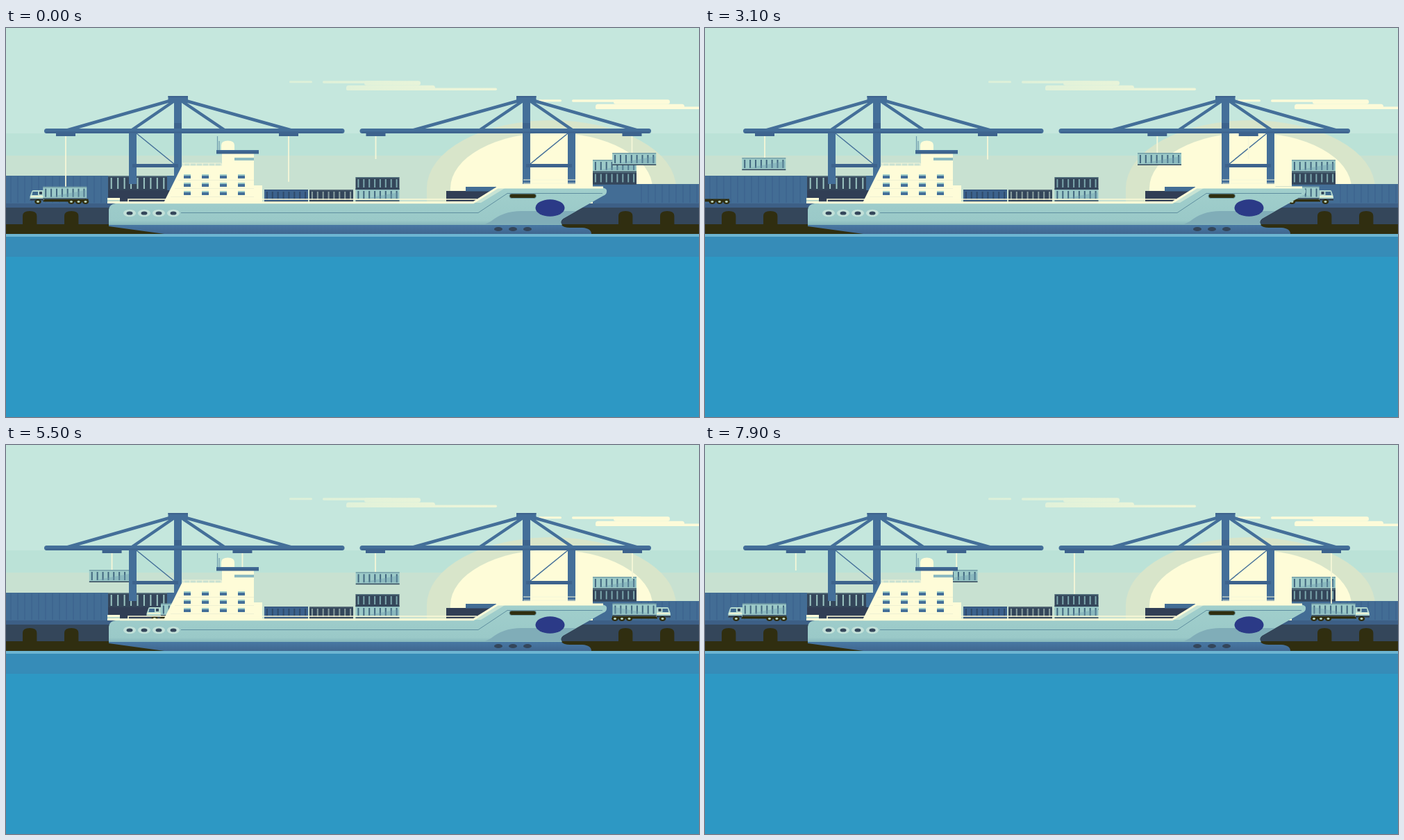
These frames come from a looping animation (998 px wide and 561 px high, 8000 ms). An HTML page:

```html
<!DOCTYPE html>
<html lang="en">
<head>
<meta charset="utf-8">
<title>Harbour</title>
<style>
  html, body { margin: 0; width: 100%; height: 100%; overflow: hidden; background: #2d98c4; }
  svg { display: block; width: 100vw; height: 100vh; }
</style>
</head>
<body>
<svg id="stage" viewBox="0 0 998 561" preserveAspectRatio="none"></svg>
<script>
const LOOP = 8000, STEP = 100;
const C = {
  steel: '#446f99', steelDark: '#3d638d', cream: '#fefcd8', teal: '#9ccac8',
  slate: '#34465a', navy: '#313e55', olive: '#302e10', wall: '#436d95'
};

const rect = (x, y, w, h, fill, extra = '') =>
  `<rect x="${x}" y="${y}" width="${w}" height="${h}" fill="${fill}" ${extra}/>`;
const path = (d, fill, extra = '') => `<path d="${d}" fill="${fill}" ${extra}/>`;
const line = (d, stroke, width = 1, extra = '') =>
  `<path d="${d}" fill="none" stroke="${stroke}" stroke-width="${width}" ${extra}/>`;
const oval = (cx, cy, rx, ry, fill) =>
  `<ellipse cx="${cx}" cy="${cy}" rx="${rx}" ry="${ry}" fill="${fill}"/>`;
const group = (id, body) => `<g id="${id}">${body}</g>`;
const mirror = (sum, body) => `<g transform="matrix(-1 0 0 1 ${sum} 0)">${body}</g>`;
const times = (n, fn) => Array.from({ length: n }, (_, i) => fn(i)).join('');

// Shipping container with vertical ribs
function box(x, y, body, rib, ribs = 8, w = 63, h = 18) {
  const gap = w / ribs;
  return rect(x, y, w, h, body)
    + line(times(ribs, i => `M${(x + gap * (i + .5)).toFixed(1)} ${y + 3}v${h - 6}`), rib, 2)
    + rect(x, y, w, 1.5, rib, 'opacity=".45"')
    + rect(x, y + h - 1.5, w, 1.5, C.slate);
}
const lightBox = (x, y) => box(x, y, C.teal, '#42677f')
  + path(`M${x + 8} ${y + 15}L${x + 62} ${y + 5}V${y + 15}Z`, '#6f9fae', 'opacity=".4"');
const darkBox = (x, y) => box(x, y, C.slate, '#7ba6ac');

function cloud(x, y, fill) {
  const bar = (dx, dy, w, h) => rect(x + dx, y + dy, w, h, fill, `rx="${h / 2}"`);
  return bar(0, 0, 33, 3) + bar(48, 0, 100, 3.4) + bar(108, 0, 81, 6.5)
    + bar(82, 6.5, 128, 7) + bar(82, 10.3, 217, 3.4);
}

// One crane; the right one is the same shape mirrored
const crane = boomLeft =>
  line('M236 105L86 148M241 106L180 148M254 106L316 148M259 105L413 148', C.steel, 4.5)
  + rect(177, 150, 11, 75, C.steel) + rect(242, 106, 11, 119, C.steel)
  + rect(242, 137, 11, 9, C.steelDark)
  + line('M188 152L242 196', C.steel, 1.5)
  + rect(182, 196, 66, 5, C.steelDark)
  + rect(boomLeft, 145, 487.5 - boomLeft, 7, C.steel, 'rx="3.5"')
  + rect(boomLeft + 2, 149.5, 483 - boomLeft, 2, C.steelDark, 'rx="1"')
  + rect(233.5, 98, 28.5, 10, C.steel) + rect(233.5, 98, 28.5, 2, C.steelDark);

const trolley = id => group(id, rect(-14, 151, 28, 5, C.steelDark))
  + `<rect id="${id}Rope" x="-.9" y="156" width="1.8" height="1" fill="#f5f7d8"/>`;

// Truck facing left, front bumper at x = 33
const wheel = x => oval(x, 250.5, 4.8, 3.5, C.olive) + oval(x, 250.5, 2, 1.4, '#b9d3bd');
const truckBody =
  rect(52, 246.5, 65, 4, C.olive)
  + path('M35.5 236Q35.5 234 38 234H53.5V248H33V243Z', '#b5dad0')
  + path('M37 236H44.5V241H36Z', '#3f6a8f') + rect(46.5, 236, 4, 4, C.slate)
  + rect(34, 242, 19, 1.5, C.cream) + rect(33, 246, 20, 3, C.slate)
  + [44.5, 92.5, 103, 113].map(wheel).join('');

function quay() {
  const ribs = (x, n, y) => line(times(n, i => `M${x + i * 10} ${y}V252`), '#3a608b', 1);
  return rect(0, 213, 252, 46, C.wall) + ribs(7, 14, 214)
    + rect(845, 225, 153, 34, C.wall) + ribs(915, 9, 226)
    + rect(0, 253, 998, 6, '#3d5f86') + rect(0, 259, 998, 24, C.slate)
    + rect(0, 283, 998, 14, C.olive)
    + [24, 84, 882, 942].map(x =>
        path(`M${x} 284V271Q${x} 264 ${x + 10.2} 264T${x + 20.4} 271V284Z`, C.olive)).join('')
    + box(147, 213, C.slate, '#9cc6c2', 9, 85, 22)
    + rect(147, 234, 90, 16, C.navy);
}

function bridge() {
  const windows = times(12, i => {
    const x = 256 + (i % 4) * 26, y = 211 + Math.floor(i / 4) * 12;
    return rect(x, y, 10, 6, C.steel) + rect(x, y, 10, 2, C.teal);
  });
  return path('M226.5 253L253.5 198.5H311V176H329V181H357V227H369V253Z', C.cream)
    + path('M310 177V169Q310 162.5 319.5 162.5T329 169V177Z', C.cream)
    + line('M304.5 156V177M307 163V177', '#6f9cae', 1.2)
    + rect(303, 176, 61, 5.5, C.steelDark) + rect(303, 176, 61, 1.5, C.steel)
    + rect(329, 187, 28, 4, '#8cbac1')
    + line('M254 195H310' + times(7, i => `M${256 + i * 9} 195v4`), '#f3f5d8', 1.2)
    + line('M248 219.5H357M243 231.5H357M237 243.5H357', '#eef0d2', 1)
    + windows;
}

function deckCargo() {
  return box(372, 233, '#3c628d', '#2f4a6a') + box(437, 233, C.slate, '#8a9fa0')
    + lightBox(503.5, 232) + darkBox(503.5, 215)
    + rect(634, 235, 66, 15, C.navy) + rect(662, 229, 44, 6.5, C.wall);
}

function hull() {
  const bow = 'L672 253L708 230H858Q866 231 865 236Q865 240 860 242L802 275Q797 279 801 284';
  return rect(146, 245, 18, 8, C.cream) + rect(146, 248, 18, 2, '#b9d8c9')
    + line('M176 253V247H678', C.cream, 1.6)
    + path('M148 286V262Q149 254 158 253' + bow + 'Z', 'url(#hullFill)')
    + path('M148 284H800Q803 288 812 288H830Q843 289 843 297H228L148 286Z', 'url(#keelFill)')
    + path('M698 279Q716 264 742 264H821L802 275Q797 279 800 283L690 283Z', '#80adb8')
    + path('M672 252L708 230H720L684 252Z', '#c7e3d4')
    + line('M164 251.7H673L708 230H860', C.cream, 3, 'stroke-linejoin="round"')
    + line('M745 219H820M745 224H820', '#f3f6d9', 1)
    + line('M252 266.5H680L722 238.5H859', '#5f8fa0', 1)
    + times(4, i => oval(178 + i * 21, 267, 9, 5.2, '#c3e1d9') + oval(178 + i * 21, 267, 4.5, 2.6, C.slate))
    + times(3, i => oval(709 + i * 21, 290, 6, 3, C.slate))
    + rect(725, 239, 38.5, 6.5, C.olive, 'rx="3.2" stroke="#6d9ca6"')
    + oval(783.5, 259.5, 21, 12.2, '#2b3a87');
}

document.getElementById('stage').innerHTML = `
  <defs>
    <linearGradient id="hullFill" x2="0" y2="1">
      <stop offset="0" stop-color="#a1cfcc"/><stop offset=".85" stop-color="#9ac9c8"/>
      <stop offset="1" stop-color="#80b1b7"/>
    </linearGradient>
    <linearGradient id="keelFill" x2="0" y2="1">
      <stop offset="0" stop-color="#4878a3"/><stop offset="1" stop-color="#406790"/>
    </linearGradient>
    <linearGradient id="haze" gradientUnits="userSpaceOnUse" x1="408" x2="707">
      <stop offset="0" stop-color="#dcf0d9"/><stop offset="1" stop-color="#eff6d9"/>
    </linearGradient>
  </defs>`
  + rect(0, 0, 998, 152, '#c5e7dd') + rect(0, 152, 998, 32, '#bbe2d7') + rect(0, 184, 998, 70, '#c8e1d1')
  + path('M606 254V231A179.5 98 0 0 1 965 231V254Z', '#d8e5ca')
  + path('M640 254V231A145.5 80 0 0 1 931 231V254Z', C.cream)
  + cloud(408, 76.3, 'url(#haze)') + cloud(767, 103.3, '#fdfbd9')
  + quay()
  + group('truckL', truckBody + group('truckLoad', lightBox(53.5, 228.5)))
  + group('truckR', mirror(990, truckBody + lightBox(53.5, 228.5)))
  + trolley('a') + trolley('b') + group('cargoL', lightBox(-31.5, 0))
  + crane(55) + mirror(997, crane(68))
  + lightBox(845, 190) + darkBox(845, 207.5)
  + trolley('c') + trolley('d') + group('cargoR', lightBox(-31.5, 0))
  + deckCargo() + bridge() + hull()
  + rect(0, 297, 998, 4.5, '#6db5d2') + rect(0, 301, 998, 29, '#368cb8') + rect(0, 330, 998, 231, '#2d98c4');

const part = Object.fromEntries([...document.querySelectorAll('g[id], rect[id]')].map(e => [e.id, e]));
const put = (id, x, y = 0) => part[id].setAttribute('transform', `translate(${x.toFixed(2)} ${y.toFixed(2)})`);
const show = (id, on) => part[id].setAttribute('visibility', on ? 'inherit' : 'hidden');

// Sine ease from one value to another over a time span
function glide(t, start, span, from, to) {
  const p = Math.min(1, Math.max(0, (t - start) / span));
  return from + (to - from) * (1 - Math.cos(Math.PI * p)) / 2;
}

function hang(id, x, end) {
  put(id, x);
  put(id + 'Rope', x);
  part[id + 'Rope'].setAttribute('height', Math.max(0, end - 156).toFixed(2));
}

function draw(t) {
  // Left crane: lift from the truck, then carry towards the ship
  const ax = glide(t, 3914, 5270, 86, 407);
  const ay = glide(t, -190, 4376, 229, 180);
  hang('a', ax, ay);
  hang('b', 493 - ax, glide(t, -570, 5236, 223, 181));
  put('cargoL', ax - 1.2, ay);

  // Right crane: carry across, then lower behind the deck stack
  const cx = glide(t, -123, 5236, 902, 532);
  const cy = glide(t, 4780, 4376, 180, 229);
  hang('c', cx, cy);
  hang('d', 1434 - cx, glide(t, 4780, 4376, 189, 238));
  put('cargoR', cx + 3.2, cy);

  // Left truck pulls away empty, later another one brakes in loaded
  const loaded = t >= 5100;
  const away = 1.5 - 87 * (Math.max(0, t - 2120) / 1000) ** 2;
  const back = 79 * (Math.max(0, 8022 - t) / 1722) ** 2;
  put('truckL', loaded ? back : away);
  show('truckL', loaded || t < 3400);
  show('truckLoad', loaded);

  // Right truck comes out from behind the bow
  put('truckR', -52 * (Math.max(0, 4364 - t) / 1264) ** 2);
  show('truckR', t >= 2300);
}

const origin = performance.now();
function tick() {
  const t = (performance.now() - origin) % LOOP;
  draw(Math.floor(t / STEP) * STEP);
  requestAnimationFrame(tick);
}
draw(0);
requestAnimationFrame(tick);
</script>
</body>
</html>
```
